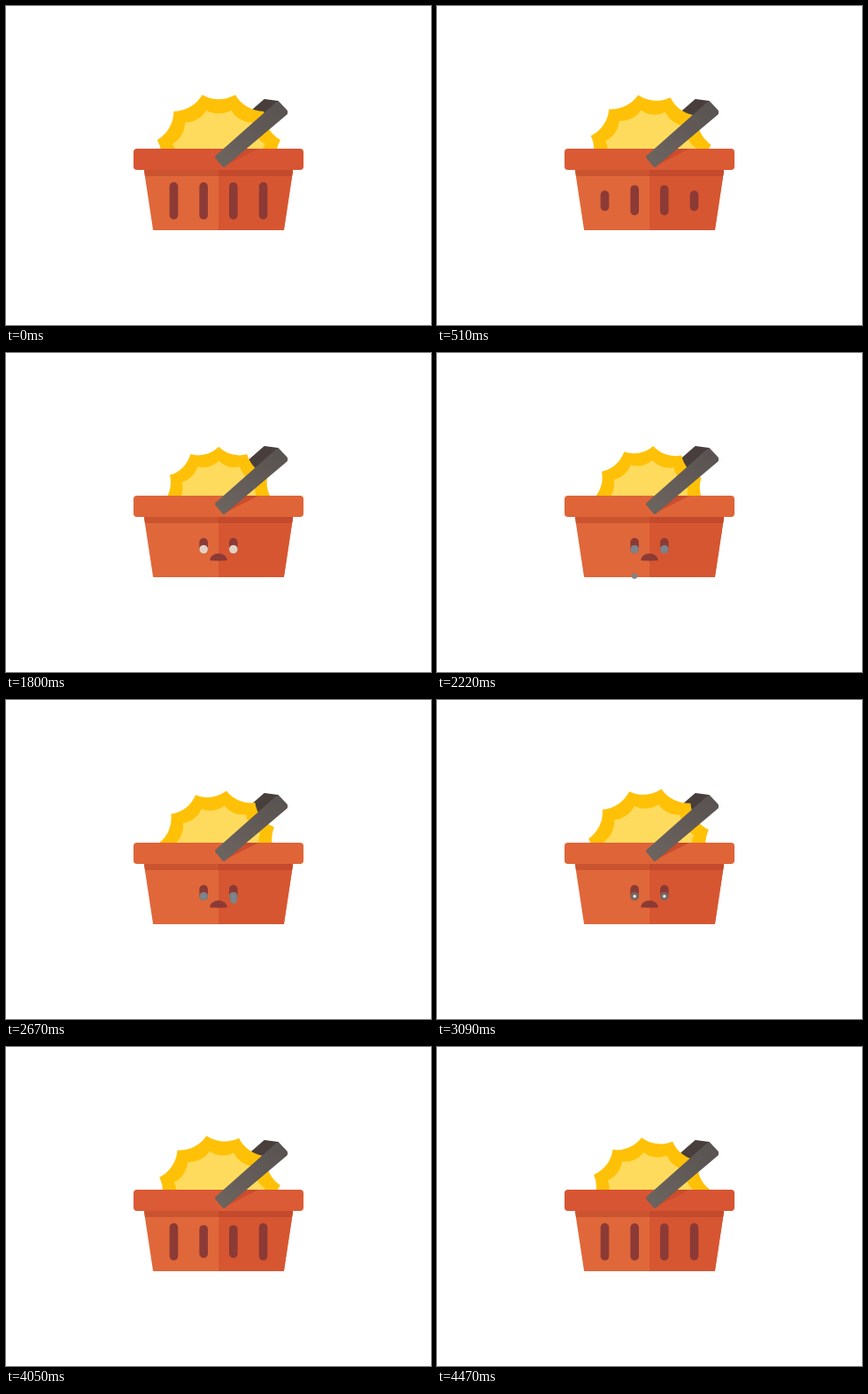
These frames come from a looping animation (480x360 px, 4500 ms). An HTML page with a canvas:

```html
<!DOCTYPE html>
<html>
<head>
<meta charset="utf-8">
<style>
html, body { margin: 0; width: 100%; height: 100%; overflow: hidden; background: #fff; }
canvas { display: block; }
</style>
</head>
<body>
<canvas id="stage" width="480" height="360"></canvas>
<script>
const ctx = document.getElementById('stage').getContext('2d');
const LOOP = 4500, STEP = 30, SUN_PERIOD = 3600;
const BROWN = '#8c3a35';
const start = performance.now();

// Eased 0..1 progress between two times
function ease(t, from, to) {
  const p = Math.min(1, Math.max(0, (t - from) / (to - from)));
  return p * p * (3 - 2 * p);
}
const mix = (a, b, p) => a + (b - a) * p;
const mixColor = (a, b, p) => `rgb(${a.map((v, i) => Math.round(mix(v, b[i], p)))})`;

function poly(color, points, round = 0) {
  ctx.beginPath();
  points.forEach(([x, y]) => ctx.lineTo(x, y));
  ctx.closePath();
  ctx.fillStyle = ctx.strokeStyle = color;
  ctx.fill();
  if (round) {
    ctx.lineWidth = round;
    ctx.lineJoin = 'round';
    ctx.stroke();
  }
}

function disc(color, x, y, r) {
  ctx.fillStyle = color;
  ctx.beginPath();
  ctx.arc(x, y, r, 0, 2 * Math.PI);
  ctx.fill();
}

function pill(x, y, w, h) {
  if (h < 0.5) return;
  ctx.fillStyle = BROWN;
  ctx.beginPath();
  ctx.roundRect(x - w / 2, y - h / 2, w, h, Math.min(w, h) / 2);
  ctx.fill();
}

// Twelve tips joined by concave arcs
function scallop(color, radius, turn) {
  let path = '';
  for (let i = 0; i <= 12; i++) {
    const a = turn + i * Math.PI / 6;
    const point = `${240.3 + radius * Math.sin(a)} ${169.8 - radius * Math.cos(a)}`;
    path += i ? `A${radius * 0.52} ${radius * 0.52} 0 0 0 ${point}` : `M${point}`;
  }
  ctx.fillStyle = color;
  ctx.fill(new Path2D(path + 'Z'));
}

function drawSun(t) {
  const phase = t / SUN_PERIOD;
  const radius = 68 + 4 * Math.cos(2 * Math.PI * phase);
  const turn = (15 + 30 * phase) * Math.PI / 180;
  ctx.save();
  ctx.beginPath();
  ctx.rect(0, 0, 480, 163);
  ctx.clip();
  scallop('#ffc107', radius, turn);
  scallop('#ffdb5d', radius * 0.75, turn);
  ctx.restore();
}

function drawBasket(face) {
  const body = [[157, 186], [323, 186], [313, 252], [167, 252]];
  poly('#e0673a', body, 2);
  ctx.save();
  ctx.beginPath();
  ctx.rect(240, 180, 100, 80);
  ctx.clip();
  poly('#d75632', body, 2);
  ctx.restore();
  poly('#cb5430', [[156, 185], [240, 185], [240, 192], [157, 192]]);
  poly('#c34a2c', [[240, 185], [324, 185], [323, 192], [240, 192]]);
  ctx.fillStyle = mixColor([215, 85, 50], [223, 100, 56], face);
  ctx.beginPath();
  ctx.roundRect(144, 161, 192, 24, 4);
  ctx.fill();
}

function drawMouth(t) {
  const size = ease(t, 550, 900) * (1 - ease(t, 3800, 4050));
  if (size <= 0) return;
  const frown = ease(t, 1150, 1550);
  const w = mix(7.2, 9.8, frown) * size * (1 + 0.15 * ease(t, 3600, 3720));
  const top = mix(7.2, 7.8, frown) * size;
  const bottom = mix(7.2, 0.4, frown) * size;
  ctx.fillStyle = BROWN;
  ctx.beginPath();
  ctx.ellipse(240, 234, w, top, 0, Math.PI, 2 * Math.PI);
  ctx.ellipse(240, 234, w, bottom, 0, 0, Math.PI);
  ctx.fill();
}

function drawTear(t, x) {
  const size = ease(t, 1450, 1750) * (1 - ease(t, 3720, 3950));
  if (size <= 0) return;
  const grey = ease(t, 1850, 2150), dim = ease(t, 2600, 3050);
  const color = grey < 1
    ? mixColor([226, 209, 196], [125, 131, 136], grey)
    : mixColor([125, 131, 136], [121, 104, 98], dim);
  disc(color, x, 221.5, 4.8 * size);
  if (dim > 0) disc(`rgba(240,232,226,${dim})`, x, 221.5, 1.7 * size);
}

function drawDrop(t, x, from) {
  const p = (t - from) / 395;
  if (p > 0 && p < 1) disc('#7d8388', x, 221.5 + 46 * p * p, mix(4.6, 2.8, p));
}

function drawFace(t) {
  const outer = 42 * (1 - ease(t, 300, 750) + ease(t, 3600, 3900));
  const inner = mix(42, 17.5, ease(t, 300, 850) * (1 - ease(t, 3800, 4150)));
  const innerY = mix(217.5, 220, (inner - 17.5) / 24.5);
  [189.5, 290.5].forEach(x => pill(x, 219.8, 9.6, outer));
  [223.2, 256.8].forEach(x => {
    pill(x, innerY, 9.6, inner);
    drawTear(t, x);
  });
  drawMouth(t);
  drawDrop(t, 223, 1900);
  drawDrop(t, 257, 2550);
}

function drawHandle() {
  const shade = ctx.createLinearGradient(240, 176, 312, 112);
  shade.addColorStop(0, '#6c645f');
  shade.addColorStop(1, '#595351');
  poly('#c94d2e', [[246, 181], [285, 161], [262, 161]]);
  poly(shade, [[238, 170.5], [307, 109.5], [316, 119], [316, 121], [246, 180]], 4);
}

function draw(t) {
  ctx.fillStyle = '#fff';
  ctx.fillRect(0, 0, 480, 360);
  poly('#483f3d', [[292, 106], [307, 108], [240, 168], [228, 162]], 2);
  drawSun(t);
  drawBasket(ease(t, 300, 850) * (1 - ease(t, 3800, 4250)));
  drawFace(t);
  drawHandle();
}

function tick() {
  const t = (performance.now() - start) % LOOP;
  draw(Math.floor(t / STEP) * STEP);
  requestAnimationFrame(tick);
}
tick();
</script>
</body>
</html>
```
